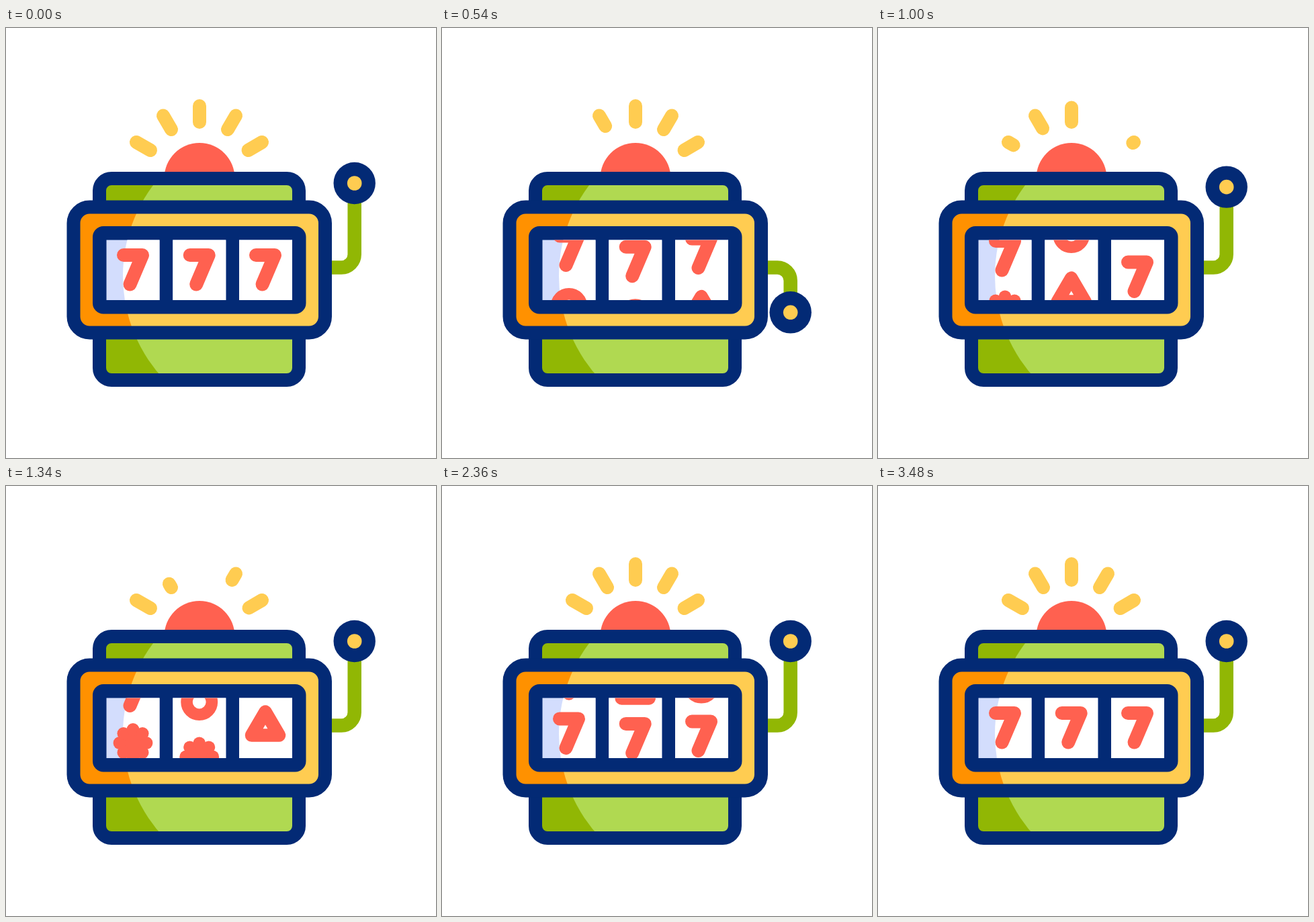
Animation, 640 px wide and 640 px high, one loop 3.6 s. Source, as an HTML page with a canvas:

```html
<!DOCTYPE html>
<html lang="en">
<head>
<meta charset="utf-8">
<title>Slot machine</title>
<style>
  html, body { margin: 0; width: 100%; height: 100%; overflow: hidden; background: #fff; }
  canvas { display: block; }
</style>
</head>
<body>
<canvas id="stage" width="640" height="640"></canvas>
<script>
const ctx = document.getElementById('stage').getContext('2d');
const LOOP = 3600;
const NAVY = '#032a75', RED = '#ff6150', YELLOW = '#ffcc51', ORANGE = '#ff9100';
const LIME = '#b0d951', GREEN = '#91b704', PALE = '#d3ddfd', WHITE = '#fff';

const clamp = x => Math.max(0, Math.min(1, x));
const smooth = x => { const u = clamp(x); return u * u * (3 - 2 * u); };

function stroke(points, width, color, closed) {
  ctx.beginPath();
  points.forEach(([x, y]) => ctx.lineTo(x, y));
  if (closed) ctx.closePath();
  ctx.lineWidth = width;
  ctx.strokeStyle = color;
  ctx.stroke();
}

function disc(x, y, r, color) {
  ctx.beginPath();
  ctx.arc(x, y, r, 0, 2 * Math.PI);
  ctx.fillStyle = color;
  ctx.fill();
}

// Rounded panel, dark on the left of one large circle and light inside it.
function panel(x, y, w, h, r, dark, light, border) {
  ctx.save();
  ctx.beginPath();
  ctx.roundRect(x, y, w, h, r);
  ctx.fillStyle = dark;
  ctx.fill();
  ctx.save();
  ctx.clip();
  disc(399, 369, 225, light);
  ctx.restore();
  if (border) {
    ctx.beginPath();
    ctx.roundRect(x, y, w, h, r);
    ctx.lineWidth = 20;
    ctx.strokeStyle = NAVY;
    ctx.stroke();
  }
  ctx.restore();
}

// Reel symbols, centred on 0,0.
const symbols = {
  seven: () => stroke([[-14, -21.5], [14, -21.5], [-4.5, 22]], 20, RED),
  triangle: () => stroke([[0, -17.5], [20.5, 17.5], [-20.5, 17.5]], 19.5, RED, true),
  ring() {
    ctx.beginPath();
    ctx.arc(0, 0, 18.7, 0, 2 * Math.PI);
    ctx.lineWidth = 17.5;
    ctx.strokeStyle = RED;
    ctx.stroke();
  },
  flower() {
    disc(0, 0, 21, RED);
    for (let i = 0; i < 8; i++) {
      const a = i * Math.PI / 4;
      disc(20 * Math.cos(a), 20 * Math.sin(a), 9.4, RED);
    }
  }
};

// strip: symbol and its place along the reel; path: time and scroll distance.
const reels = [
  { left: 149.5, x: 189,
    strip: [['seven', 0], ['ring', 83.5], ['triangle', 165], ['seven', 243],
            ['flower', 324.5], ['seven', 402], ['flower', 479.5], ['seven', 558]],
    path: [[440, 0], [540, 28], [1000, 263.5], [1340, 456], [1605, 558]] },
  { left: 248.3, x: 287.7,
    strip: [['seven', 0], ['ring', 83.5], ['triangle', 165.5], ['seven', 243],
            ['ring', 316], ['flower', 397.5], ['triangle', 479.5], ['seven', 556.5]],
    path: [[470, 0], [540, 12], [1000, 135], [1340, 353.5], [1869, 556.5]] },
  { left: 347, x: 386,
    strip: [['seven', 0], ['triangle', 82], ['ring', 164], ['seven', 252],
            ['flower', 333], ['triangle', 415], ['ring', 497], ['seven', 573]],
    path: [[445, 0], [540, 24], [1000, 241], [1340, 420.5], [1740, 573]] }
];

// Smooth curve through the points of a path.
function along(path, t) {
  const last = path.length - 1;
  const slope = i => {
    if (i === 0) return 0;
    const a = path[i - 1], b = path[Math.min(last, i + 1)];
    return (b[1] - a[1]) / (b[0] - a[0]);
  };
  if (t <= path[0][0]) return path[0][1];
  let i = 0;
  while (i < last - 1 && t > path[i + 1][0]) i++;
  const [t0, y0] = path[i], [t1, y1] = path[i + 1];
  const d = t1 - t0, u = clamp((t - t0) / d), v = 1 - u;
  return y0 * v * v * (1 + 2 * u) + slope(i) * d * u * v * v
       + y1 * u * u * (3 - 2 * u) - slope(i + 1) * d * u * u * v;
}

// Parabolic hops that shrink after the reel has landed.
function bounce(t) {
  let span = 400, height = 36;
  while (t > span && height > 0.02) {
    t -= span;
    span *= 0.71;
    height *= 0.71 * 0.71;
  }
  const u = clamp(t / span);
  return 4 * height * u * (1 - u);
}

function drawReel({ left, x, strip, path }, t) {
  const land = path[path.length - 1][0];
  const scroll = t < land ? along(path, t) : path[path.length - 1][1] - bounce(t - land);
  panel(left, 315.5, 79, 89.5, 0, PALE, WHITE, false);
  ctx.save();
  ctx.beginPath();
  ctx.rect(left, 315.5, 79, 89.5);
  ctx.clip();
  for (const [name, place] of strip) {
    const y = 359.5 + place - scroll;
    if (y < 270 || y > 450) continue;
    ctx.save();
    ctx.translate(x, y);
    symbols[name]();
    ctx.restore();
  }
  ctx.restore();
}

// Each ray is given from its outer to its inner end.
const rays = [
  [[194, 170], [215, 182]],
  [[234, 130.5], [246, 151]],
  [[288, 116], [288, 140]],
  [[342, 130.5], [330, 151]],
  [[381, 170], [360.5, 182]]
];

// Erased from the inside out, then drawn again from the inside; two waves.
function drawRay([outer, inner], index, t) {
  const ERASE = 228, HOLD = 156, GROW = 78;
  const first = 311 + 118 * index, second = first + 508;
  const at = u => [outer[0] + (inner[0] - outer[0]) * u, outer[1] + (inner[1] - outer[1]) * u];
  const age = t - (t < second ? first : second);
  let from = 0, to = 1;
  if (age > 0 && age < ERASE) {
    to = 1 - (age / ERASE) ** 2;
  } else if (age >= ERASE) {
    from = 1 - clamp((age - ERASE - HOLD) / GROW);
  }
  if (to - from > 0.001) stroke([at(from), at(to)], 20, YELLOW);
}

function drawLever(t) {
  const X = 518.7, BASE = 356.5, UP = 231, DOWN = 485;
  const pull = smooth(t / 291) - smooth((t - 291) / 779);
  const y = UP + (DOWN - UP) * pull;
  const r = Math.min(19.5, Math.abs(y - BASE));
  ctx.beginPath();
  ctx.moveTo(480, BASE);
  ctx.lineTo(X - r, BASE);
  ctx.arcTo(X, BASE, X, y, r);
  ctx.lineTo(X, y);
  ctx.lineWidth = 20.5;
  ctx.strokeStyle = GREEN;
  ctx.stroke();
  disc(X, y, 31.2, NAVY);
  disc(X, y, 10.8, YELLOW);
}

function draw(t) {
  ctx.fillStyle = WHITE;
  ctx.fillRect(0, 0, 640, 640);
  ctx.lineCap = ctx.lineJoin = 'round';
  rays.forEach((ray, i) => drawRay(ray, i, t));
  disc(288, 223.5, 52.5, RED);
  drawLever(t);
  panel(139, 224, 297, 300, 18, GREEN, LIME, true);
  panel(100.5, 266.5, 374.5, 187, 24, ORANGE, YELLOW, true);
  ctx.beginPath();
  ctx.roundRect(129, 295, 317.5, 130.5, 16);
  ctx.fillStyle = NAVY;
  ctx.fill();
  reels.forEach(reel => drawReel(reel, t));
}

const start = performance.now();
function tick() {
  draw((performance.now() - start) % LOOP);
  requestAnimationFrame(tick);
}
tick();
</script>
</body>
</html>
```
